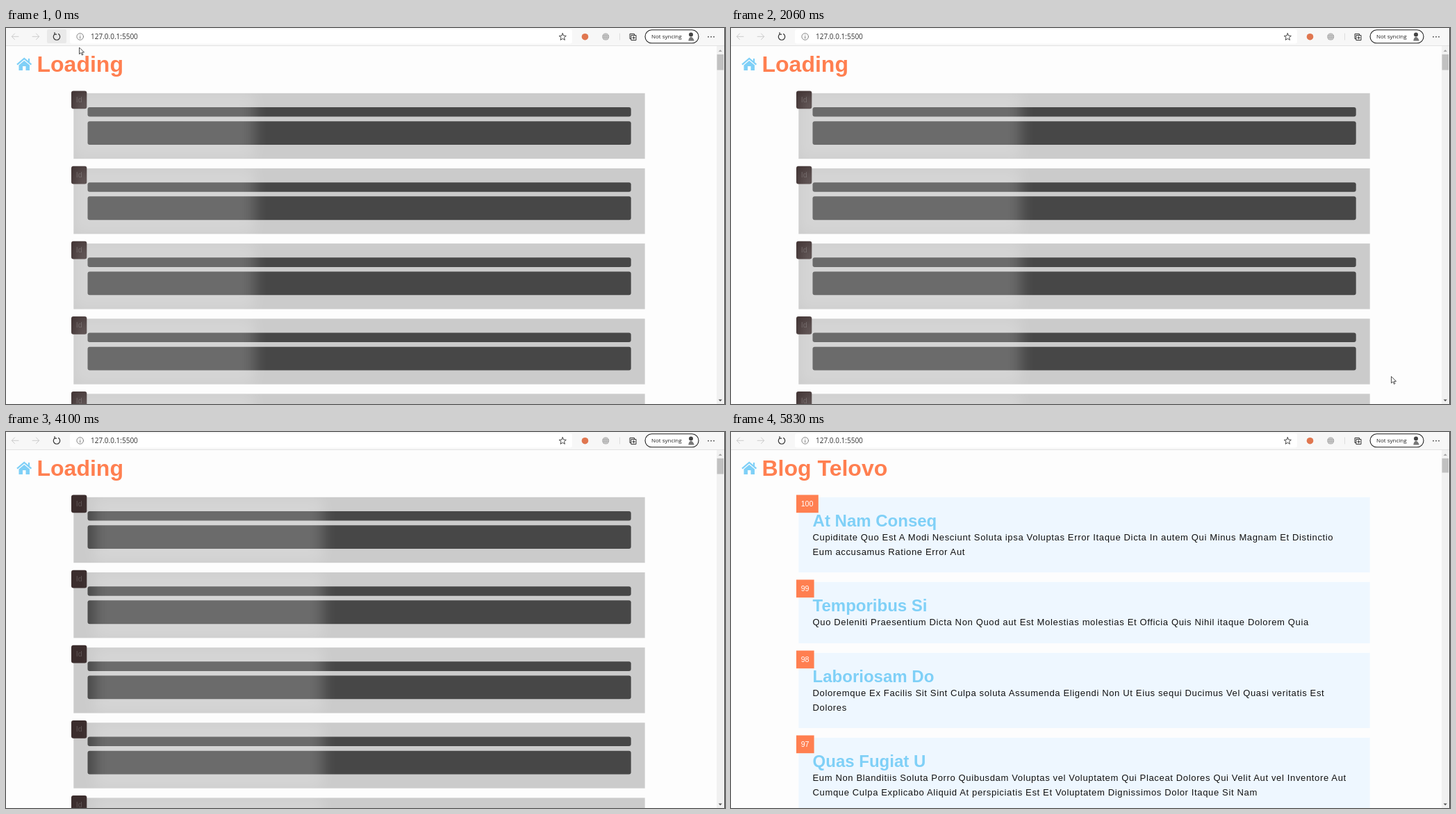
Recreate the animation shown at these times as an HTML page. Size 1035 by 541 pixels, loop 7070 ms.

```html
<!DOCTYPE html>
<html lang="en">
<head>
<meta charset="utf-8">
<title>Skeleton loading</title>
<style>
  html, body { margin: 0; width: 100%; height: 100%; overflow: hidden; background: #fdfdfd; }
  svg { display: block; }
  text { white-space: pre; }
  .ui { font-family: "Open Sans", "Noto Sans", sans-serif; }
  .page { font-family: "Liberation Sans", Arial, sans-serif; }
  .title { font-size: 32px; font-weight: bold; fill: #ff7f50; }
  .heading { font-size: 24px; font-weight: bold; fill: #7fd0f7; }
  .body { font-size: 13px; letter-spacing: .65px; fill: #111; }
  .badge { font-size: 10.67px; }
  .line { fill: none; stroke: #333; stroke-linecap: round; stroke-linejoin: round; }
</style>
</head>
<body>
<svg width="1035" height="541" viewBox="0 0 1035 541">
  <defs>
    <filter id="soft" filterUnits="userSpaceOnUse" x="40" y="40" width="940" height="640" color-interpolation-filters="sRGB">
      <feGaussianBlur stdDeviation="10"/>
    </filter>
    <clipPath id="cardArea"></clipPath>
  </defs>
  <rect width="1035" height="541" fill="#fdfdfd"/>

  <g id="skeleton" class="page">
    <text class="title" x="44.5" y="63">Loading</text>
    <g id="blanks"></g>
    <g filter="url(#soft)">
      <g clip-path="url(#cardArea)">
        <rect id="shimmer" y="90" width="329" height="540" fill="#fff" fill-opacity=".2"/>
      </g>
    </g>
  </g>

  <g id="content" class="page" display="none">
    <text class="title" x="44.5" y="63">Blog Telovo</text>
  </g>

  <g fill="#7fd0f7">
    <path d="M18.5 53.5 26.2 47 34 53.5V61H28.5V55H24V61H18.5Z"/>
    <path d="M16 52.7 26.2 44 36.4 52.7M33 44V49" fill="none" stroke="#7fd0f7" stroke-width="2.2"/>
  </g>

  <g id="toolbar" class="ui">
    <rect width="1035" height="25" fill="#f7f7f7"/>
    <rect y="25" width="1035" height="1" fill="#e3e3e3"/>
    <rect id="hover" x="59" y="2" width="28" height="20" rx="2" fill="#e9e9e9"/>
    <rect x="92" y="2" width="723" height="20.5" rx="3" fill="#fff"/>
    <g class="line" stroke-width="1">
      <path d="M18 12.3H8.5M12.5 8 8.3 12.3 12.5 16.6M38 12.3H47.5M43.5 8 47.7 12.3 43.5 16.6" style="stroke:#ccc"/>
      <path d="M70.3 8.7A4.7 4.7 0 1 0 75.5 8.6M70 6.7V9.2H72.6" stroke-width="1.2"/>
      <g style="stroke:#777">
        <circle cx="106.7" cy="12.4" r="4.8" stroke-width=".9"/>
        <path d="M106.7 12V15M106.7 9.9V10"/>
      </g>
      <path id="star" stroke-width=".9"/>
      <path d="M883.5 8V17" style="stroke:#ddd"/>
      <path d="M899.5 15.5H898V8.5H904.5V10M900.2 10.5H907V17.5H900.2ZM903.6 12.2V15.8M901.8 14H905.4"/>
      <rect x="920" y="2.8" width="77" height="19" rx="9.5" fill="#fff" style="fill:#fff;stroke:#222" stroke-width="1.1"/>
    </g>
    <circle cx="833.5" cy="12.7" r="4.8" fill="#e0764f"/>
    <circle cx="863.2" cy="12.6" r="5" fill="#a9a9a9"/>
    <path d="M858.2 12.6H868.2M863.2 7.6V17.6M859.4 9.9H867M859.4 15.3H867" stroke="#d8d8d8" stroke-width=".6"/>
    <ellipse cx="863.2" cy="12.6" rx="2.4" ry="5" fill="none" stroke="#d8d8d8" stroke-width=".6"/>
    <circle cx="986" cy="9.5" r="3" fill="#444"/>
    <path d="M982.3 18.5Q983 13 986 13T990.7 18.5Z" fill="#777"/>
    <g fill="#444">
      <circle cx="1011" cy="12.7" r=".9"/><circle cx="1015" cy="12.7" r=".9"/><circle cx="1019" cy="12.7" r=".9"/>
    </g>
    <text x="122" y="16" font-size="10" fill="#333">127.0.0.1:5500</text>
    <text x="929" y="15.4" font-size="8" fill="#222">Not syncing</text>
  </g>

  <rect x="1023" y="26" width="11" height="515" fill="#f1f1f1"/>
  <rect id="thumb" x="1023.5" y="38" width="9.5" height="22.5" fill="#c1c1c1"/>
  <path d="M1025.6 34 1028.2 31.2 1030.8 34Z" fill="#a3a3a3"/>
  <path d="M1025.6 534.5 1028.2 537.3 1030.8 534.5Z" fill="#505050"/>
  <rect x="1034" width="1" height="541" fill="#444"/>

  <path id="cursor" d="M0 0V9.6L2.3 7.5 3.9 11 5.4 10.3 3.9 7H7Z" fill="#fff" stroke="#222" stroke-width=".8"/>
</svg>

<script>
  const $ = id => document.getElementById(id);
  const LOOP = 7070, LOADED = 5830;

  const ticks = [0, 160, 320, 480, 650, 800, 960, 1120, 1270, 1420, 1590, 1750, 1900,
    2060, 2210, 2370, 2520, 2670, 2840, 3000, 3150, 3310, 3460, 3620, 3780, 3940,
    4100, 4250, 4420, 4570, 4720, 4880, 5040, 5190, 5360, 5510, 5680, LOADED];

  // time, x, y
  const cursorPath = [[0, 105.5, 28], [160, 106, 28], [480, 166, 66], [650, 234.5, 100],
    [1420, 671.5, 305], [1750, 868, 400], [1900, 950, 474], [2210, 951, 527], [2670, 966, 533]];
  const CURSOR_GONE = 2840;

  const posts = [
    [94, 108, 100, "At Nam Conseq",
      "Cupiditate Quo Est A Modi Nesciunt Soluta ipsa Voluptas Error Itaque Dicta In autem Qui Minus Magnam Et Distinctio",
      "Eum accusamus Ratione Error Aut"],
    [216, 88, 99, "Temporibus Si",
      "Quo Deleniti Praesentium Dicta Non Quod aut Est Molestias molestias Et Officia Quis Nihil itaque Dolorem Quia"],
    [318, 108, 98, "Laboriosam Do",
      "Doloremque Ex Facilis Sit Sint Culpa soluta Assumenda Eligendi Non Ut Eius sequi Ducimus Vel Quasi veritatis Est",
      "Dolores"],
    [440, 108, 97, "Quas Fugiat U",
      "Eum Non Blanditiis Soluta Porro Quibusdam Voluptas vel Voluptatem Qui Placeat Dolores Qui Velit Aut vel Inventore Aut",
      "Cumque Culpa Explicabo Aliquid At perspiciatis Est Et Voluptatem Dignissimos Dolor Itaque Sit Nam"]
  ];

  const rect = (x, y, w, h, fill, r = 0) =>
    `<rect x="${x}" y="${y}" width="${w}" height="${h}" rx="${r}" fill="${fill}"/>`;
  const label = (cls, x, y, str, fill) =>
    `<text class="${cls}" x="${x}" y="${y}"${fill ? ` fill="${fill}"` : ""}>${str}</text>`;

  function buildBlanks() {
    let cards = "", area = "";
    for (let i = 0; i < 5; i++) {
      const y = 93.8 + i * 108.15;
      area += rect(97.3, y, 822.4, 94.4, "#000");
      cards += rect(97.3, y, 822.4, 94.4, "#cbcbcb") +
        rect(117.5, y + 20.2, 782.2, 13.6, "#474747", 3) +
        rect(117.5, y + 40.4, 782.2, 33.8, "#474747", 3) +
        rect(94, y - 3.3, 22.3, 25.8, "#3b2d2d", 3) +
        label("badge", 100.7, y + 13.2, "Id", "#5d5353");
    }
    $("blanks").innerHTML = cards;
    $("cardArea").innerHTML = area;
  }

  function buildPosts() {
    $("content").innerHTML += posts.map(([y, h, id, heading, ...lines]) =>
      rect(97.3, y - .2, 822.4, h + .2, "#eef7ff") +
      rect(94, y - 3.5, id > 99 ? 31.8 : 25.6, 25.7, "#ff7f50") +
      label("badge", 100.7, y + 13, id, "#fff") +
      label("heading", 117.6, y + 42, heading) +
      lines.map((line, i) => label("body", 117.5, y + 62 + i * 20.6, line)).join("")
    ).join("");
  }

  function buildStar() {
    const points = Array.from({ length: 10 }, (_, i) => {
      const r = i % 2 ? 2.4 : 5.3, a = i * Math.PI / 5;
      return `${(801.3 + r * Math.sin(a)).toFixed(2)} ${(13 - r * Math.cos(a)).toFixed(2)}`;
    });
    $("star").setAttribute("d", `M${points.join("L")}Z`);
  }

  function cursorAt(t) {
    const next = cursorPath.findIndex(p => p[0] > t);
    if (next < 0) return cursorPath[cursorPath.length - 1].slice(1);
    const [t0, x0, y0] = cursorPath[next - 1], [t1, x1, y1] = cursorPath[next];
    const k = (t - t0) / (t1 - t0);
    return [x0 + (x1 - x0) * k, y0 + (y1 - y0) * k];
  }

  const show = (id, on) => $(id).setAttribute("display", on ? "inline" : "none");

  function draw(time) {
    const t = ticks.filter(tick => tick <= time).pop();
    const loaded = t >= LOADED;
    show("skeleton", !loaded);
    show("content", loaded);
    show("hover", t < 160);
    show("cursor", t < CURSOR_GONE);
    $("thumb").setAttribute("height", loaded ? 20.5 : 22.5);
    $("cursor").setAttribute("transform", `translate(${cursorAt(t)})`);
    // one sweep per second, from -20% to 100% of the card width
    const phase = (t / 1000 + .097) % 1;
    $("shimmer").setAttribute("x", 97.3 + 822.4 * (-.2 + 1.2 * phase));
  }

  buildBlanks();
  buildPosts();
  buildStar();
  const start = performance.now();
  function loop() {
    draw((performance.now() - start) % LOOP);
    requestAnimationFrame(loop);
  }
  loop();
</script>
</body>
</html>
```
